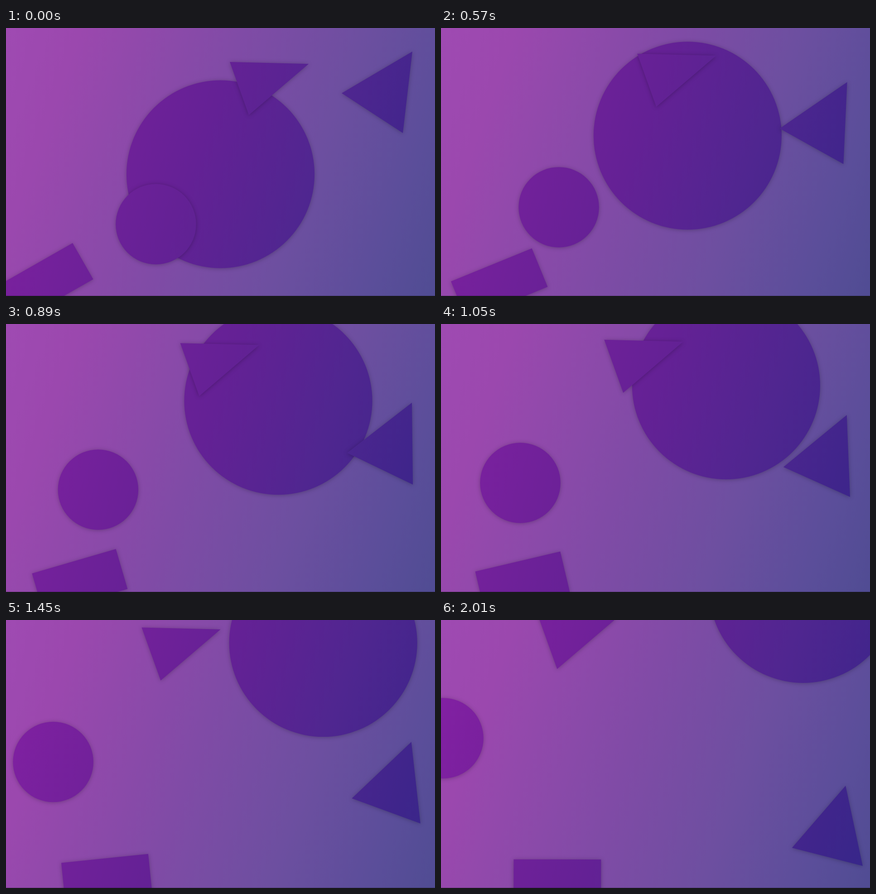
Write an HTML page that moves like this. It is 947x592 px and loops after 2.26 s.

```html
<!DOCTYPE html>
<html lang="en">
<head>
<meta charset="utf-8">
<title>Drifting shapes</title>
<style>
  html, body { margin: 0; width: 100%; height: 100%; overflow: hidden; }
  svg { display: block; width: 947px; height: 592px; }
  .shape { fill: url(#deep); filter: drop-shadow(0 1px 5px rgba(0, 0, 0, .25)); }
</style>
</head>
<body>
<svg viewBox="0 0 947 592">
  <defs>
    <linearGradient id="pale" gradientUnits="userSpaceOnUse" x1="-39.6" y1="109.3" x2="986.6" y2="482.7">
      <stop offset="0" stop-color="#9f4ab2"/>
      <stop offset=".142" stop-color="#9b48ae"/>
      <stop offset=".45" stop-color="#804ba6"/>
      <stop offset=".68" stop-color="#6d4fa0"/>
      <stop offset=".87" stop-color="#5b4e9a"/>
      <stop offset="1" stop-color="#504c93"/>
    </linearGradient>
    <linearGradient id="deep" gradientUnits="userSpaceOnUse" x1="-39.6" y1="109.3" x2="986.6" y2="482.7">
      <stop offset="0" stop-color="#8620a4"/>
      <stop offset=".3" stop-color="#6f2199"/>
      <stop offset=".45" stop-color="#642195"/>
      <stop offset=".68" stop-color="#502690"/>
      <stop offset=".87" stop-color="#3f258b"/>
      <stop offset="1" stop-color="#352789"/>
    </linearGradient>
  </defs>
  <rect width="947" height="592" fill="url(#pale)"/>
  <circle id="bigDisc" class="shape" r="207.6"/>
  <circle id="smallDisc" class="shape" r="88.8"/>
  <polygon id="topTriangle" class="shape"/>
  <polygon id="sideTriangle" class="shape"/>
  <polygon id="block" class="shape"/>
  <rect y="591" width="947" height="1" opacity=".25"/>
</svg>
<script>
const LOOP = 2260, HOLD = 250, STEP = 80, LAST_STEP = 23;
const byId = id => document.getElementById(id);

// Positions and angles are start values; vx, vy and spin are per step.
const discs = [
  { el: byId('bigDisc'), x: 473.5, y: 323, vx: 14.17, vy: -17.03 },
  { el: byId('smallDisc'), x: 330.9, y: 433.4, vx: -14.17, vy: -7.49 }
];
const polygons = [
  { el: byId('topTriangle'), x: 494, y: 75, vx: -12.16, vy: -3.65, angle: 0, spin: 0,
    points: [[0, 0], [174.2, 4.2], [42, 117.2]] },
  { el: byId('sideTriangle'), x: 838, y: 142.6, vx: 1.23, vy: 14.27, angle: 0, spin: -0.813,
    points: [[59, -90.6], [-97, 1.3], [38, 89.4]] },
  { el: byId('block'), x: 86, y: 562.8, vx: 8.54, vy: 0.6, angle: -29.7, spin: 1.49, stop: 20,
    points: [[-96.5, -46], [96.5, -46], [96.5, 46], [-96.5, 46]] }
];

function placeDisc(disc, n) {
  disc.el.setAttribute('cx', disc.x + disc.vx * n);
  disc.el.setAttribute('cy', disc.y + disc.vy * n);
}

// Vertices are computed directly so the gradient stays fixed to the stage.
function placePolygon(shape, n) {
  const step = Math.min(n, shape.stop ?? LAST_STEP);
  const a = (shape.angle + shape.spin * step) * Math.PI / 180;
  const cos = Math.cos(a), sin = Math.sin(a);
  const cx = shape.x + shape.vx * step, cy = shape.y + shape.vy * step;
  shape.el.setAttribute('points', shape.points.map(([x, y]) =>
    `${(cx + x * cos - y * sin).toFixed(2)},${(cy + x * sin + y * cos).toFixed(2)}`).join(' '));
}

function draw(time) {
  const t = time % LOOP;
  const n = t < HOLD ? 0 : Math.min(LAST_STEP, Math.floor((t - HOLD) / STEP) + 1);
  discs.forEach(disc => placeDisc(disc, n));
  polygons.forEach(shape => placePolygon(shape, n));
}

let start;
function tick(now) {
  start ??= now;
  draw(now - start);
  requestAnimationFrame(tick);
}
draw(0);
requestAnimationFrame(tick);
</script>
</body>
</html>
```
